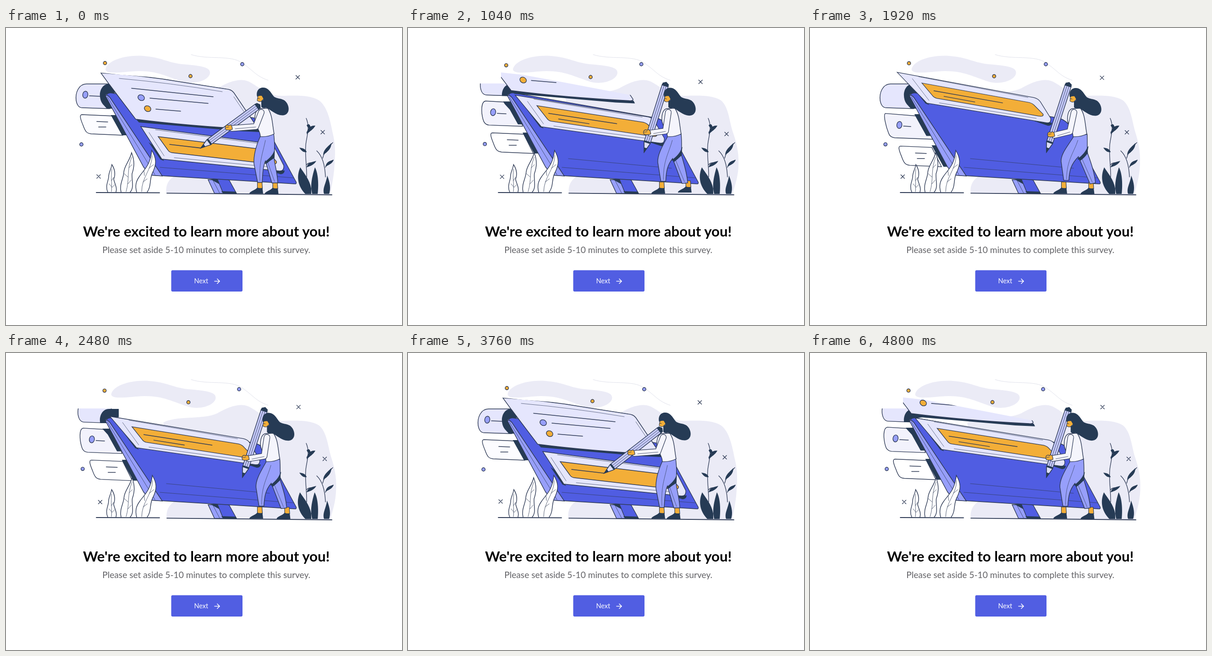
These frames come from a looping animation (864x648 px, 4.88 s). An HTML page with a canvas:

```html
<!DOCTYPE html>
<html lang="en">
<head>
<meta charset="utf-8">
<title>Survey welcome</title>
<style>
html, body { margin: 0; width: 864px; height: 648px; overflow: hidden; background: #fff; }
canvas, svg { position: absolute; left: 0; top: 0; display: block; }
text { font-family: Lato, sans-serif; text-anchor: middle; }
</style>
</head>
<body>
<canvas id="art" width="864" height="648"></canvas>
<svg width="864" height="648" viewBox="0 0 864 648">
  <text x="437.2" y="455.4" font-size="31.2" font-weight="700" fill="#050505">We're excited to learn more about you!</text>
  <text x="437.2" y="491.2" font-size="19.15" fill="#626266">Please set aside 5-10 minutes to complete this survey.</text>
  <rect x="360.5" y="528.5" width="155.5" height="46.5" rx="3" fill="#515ee2"/>
  <text x="425.8" y="557" font-size="14.4" fill="#fff">Next</text>
  <path d="M454.5 552.5H466M460.5 547L466 552.5L460.5 558" fill="none" stroke="#fff" stroke-width="1.6"/>
</svg>
<script>
const g = document.getElementById('art').getContext('2d');
const NAVY = '#263b55', INK = '#2e3a55', BLUE = '#505de2', PERI = '#979ffb',
      PALE = '#e5e6fd', GOLD = '#f3ae38', MIST = '#ebebf6', SHIRT = '#f5f5fc';
const LOOP = 4880, STEP = 80, HALF = 1840;

const lerp = (a, b, k) => a + (b - a) * k;
const clamp = k => Math.max(0, Math.min(1, k));
const smooth = k => (1 - Math.cos(Math.PI * clamp(k))) / 2;
const NUM = /-?\d+(\.\d+)?/g;

// value at s on eased keys
function track(s, times, vals) {
  let i = 0;
  while (i < times.length - 2 && s > times[i + 1]) i++;
  return lerp(vals[i], vals[i + 1], smooth((s - times[i]) / (times[i + 1] - times[i])));
}

// blend two paths of the same structure
function mix(a, b, k) {
  const to = b.match(NUM);
  let i = 0;
  return a.replace(NUM, v => lerp(+v, +to[i++], k).toFixed(2));
}

function shape(d, fill, stroke, width = 1.4) {
  const p = new Path2D(d);
  if (fill) { g.fillStyle = fill; g.fill(p); }
  if (stroke) { g.strokeStyle = stroke; g.lineWidth = width; g.stroke(p); }
}
const line = (d, width = 1.5, color = INK) => shape(d, null, color, width);

function oval(x, y, rx, ry, fill, turn = 0, width = 1.4) {
  g.beginPath();
  g.ellipse(x, y, rx, ry, turn, 0, 7);
  g.fillStyle = fill; g.fill();
  g.strokeStyle = INK; g.lineWidth = width; g.stroke();
}

function group(fn, x = 0, y = 0) {
  g.save(); g.translate(x, y); fn(); g.restore();
}

const DRIFT = [0, 640, 1160, 1360, HALF];
const drift = (s, ...vals) => track(s, DRIFT, vals);

function backdrop(s) {
  group(() => shape('M217 90C221 71 260 58 300 61C340 64 350 75 385 79C420 82 446 84 445 98C444 114 410 125 385 117C350 106 332 94 290 94C255 95 218 103 217 90Z', MIST),
    drift(s, 0, 8, 12.5, 12.5, 4));
  const calm = 'M343 152C370 136 430 146 460 132C485 118 510 108 530 117C555 130 570 149 605 148C640 147 665 147 683 158C702 172 708 205 713 230C718 250 719 270 717 292C716 325 710 345 708 363L350 361C348 345 352 328 378 318Z';
  const full = 'M343 152C370 136 430 146 460 132C485 118 510 108 530 117C555 130 570 149 605 148C640 147 665 147 683 158C697 172 694 198 704 222C713 242 725 268 725 300C725 330 714 345 708 363L352 361C350 345 356 330 378 318Z';
  shape(mix(calm, full, drift(s, 0, 1, .45, .05, .4)), MIST);
  line('M404 58C440 70 490 58 515 76C540 93 545 105 572 114', 1, '#dfe0ea');
}

function floaters(s) {
  const dot = (x, y, fill) => oval(x, y, 3.7, 3.7, fill, 0, 1.4);
  dot(drift(s, 216, 209, 215, 215, 216), drift(s, 76.5, 77, 82, 82.3, 76.5), GOLD);
  dot(drift(s, 402.5, 401, 398, 398, 402), drift(s, 105, 105, 107.3, 108.5, 105), GOLD);
  dot(drift(s, 515.5, 512.5, 508.6, 508.5, 515), 79, PERI);
  dot(drift(s, 164.5, 169.6, 167.4, 166, 164.5), drift(s, 254, 254, 253, 251.3, 254), PERI);
  const cross = (x, y) => line(`M${x - 4} ${y - 4}l8 8m0 -8l-8 8`, 1.3);
  cross(drift(s, 636.5, 638.5, 638.2, 638.2, 637), drift(s, 107.5, 114, 118, 117, 108));
  cross(drift(s, 691, 693, 695.3, 696.5, 691), drift(s, 227.3, 232.5, 231, 231.5, 227.3));
  cross(drift(s, 202, 203.5, 205.5, 205, 202), drift(s, 324, 322, 325, 326.8, 324));
}

// skew about the ground so only the tip travels
function sway(dx, tall, fn) {
  g.save();
  g.transform(1, 0, -dx / tall, 1, dx / tall * 360, 0);
  fn();
  g.restore();
}

function rightPlants(s) {
  const w = drift(s, 0, 1, .4, .2, 0);
  const leaf = d => shape(d, NAVY);
  line('M655 197C664 218 656 235 654 255C652 280 656 292 656 325M656 228Q661 220 668 217M654 270L645 264M656 298Q662 292 671 295', 1.3);
  leaf('M656 232C657 218 664 212 675 213C670 222 664 224 656 232Z');
  leaf('M656 212C662 207 664 212 665 220Q658 219 656 212Z');
  leaf('M656 271C648 272 643 266 640 261C648 262 654 264 656 271Z');
  leaf('M656 304C658 294 666 293 677 290C672 299 664 301 656 304Z');
  line('M678 268C691 280 696 300 697 325M691 284Q694 269 713 250M697 304Q700 293 714 288', 1.3);
  leaf('M692 277C693 265 700 261 710 251C710 263 702 270 692 277Z');
  leaf('M697 303C699 292 705 290 715 288C711 297 704 298 697 303Z');
  sway(-2 * w, 60, () => {
    leaf('M653 362C637 345 633 325 642 304C651 318 662 330 666 350L666 362Z');
    leaf('M668 362C664 345 666 330 674 304C682 318 682 345 680 362Z');
    leaf('M694 362C690 350 698 340 701 322C707 338 709 350 705 362Z');
  });
}

function leftPlants(s) {
  const w = drift(s, 0, 1, .25, .15, 0);
  sway(-2 * w, 60, () => {
    shape('M222 358C216 345 223 335 224 325C224 314 229 310 231 298C238 309 239 320 235 330C237 340 243 348 240 358', '#fff', INK);
    line('M231 308C228 325 232 340 230 357M230 333L235 326M230 346L225 340M231 348L237 342', .8);
  });
  sway(4 * w, 87, () => {
    shape('M251 358C247 340 256 330 257 315C258 300 270 290 274 272C281 290 280 303 275 318C274 333 280 348 271 358', '#fff', INK);
    line('M274 282C263 310 270 330 262 357M268 305L275 298M266 325L258 318M266 340L273 332', .8);
  });
  sway(5 * w, 91, () => {
    shape('M285 358C281 343 284 334 291 324C301 309 315 300 318 267C329 285 328 297 321 313C312 327 318 345 308 358', '#fff', INK);
    line('M319 278C318 310 296 325 296 357M312 306L322 298M302 322L301 312M299 336L308 329', .8);
  });
}

// sheets already rolled over the back edge
function roll(p) {
  const dx = 22 * p, dy = 66 * p;
  const edge = 'M226 122C205 121 199 150 211 166L222 178L292 304L315 304L218 145L246 140L246 122Z';
  const band = (top, bottom) => {
    const y = Math.max(121, top);
    g.save();
    g.beginPath(); g.rect(140, y, 200, bottom - y); g.clip();
    shape(edge, NAVY);
    g.restore();
  };
  const round = 'M225 122L176 122C158 122 151 142 153 158C155 169 159 174 167 174L226 176Z';
  const slant = 'M246 184L166 178C159 180 164 206 169 220C171 227 175 230 182 231L262 234Z';
  if (p > 0) {
    g.save();
    g.beginPath(); g.rect(140, 121, 200, 200); g.clip();
    group(() => shape(round, PALE, INK), 12 * (1 - p), -66 * (1 - p));
    g.restore();
    band(56 + dy, 110 + dy);
  }
  shape(mix(round, slant, p / .87), p < .3 ? PALE : '#f2f2fc', INK);
  band(122 + dy, 176 + dy * .9);
  group(() => {
    oval(173, 145.5, 5.6, 7.6, PERI, .15);
    line(`M182 148L${206 - 8 * p} 149`);
  }, dx, dy);
  group(() => {
    shape('M234 192L166 189C159 189 163 200 168 212C173 226 176 230 186 231L255 234Z', p ? '#fff' : '#fcfcff', INK);
    line('M198 204L222 205M202 216L218 216');
  }, dx * 1.45, dy * 1.04);
  band(190 + dy, 234 + dy * 1.04);
}

function board() {
  shape('M441 331L465 331L480 361L455 361Z', PERI, INK);
  line('M452 333L466 360', .8);
  shape('M446 330L466 330L468 342Z', NAVY);
  shape('M458 322L487 332L503 361L474 361Z', BLUE, INK);
  shape('M470 356L501 357L504 362L474 362Z', NAVY);
  shape('M218 149Q220 140 232 142L545 197Q560 203 567 214L633 336Q635 341 629 340L318 321Z', BLUE, INK);
  line('M350 285L575 306M336 304L627 327', .7);
  shape('M217 148Q220 144 227 152L341 323L314 321L300 303Z', PERI, INK);
  line('M221 150L325 320', .8);
}

function questionSheet(p) {
  g.save();
  const far = 132 + 23 * p;
  g.clip(new Path2D(`M203 97L250 102L330 ${108 + 15 * p}L480 ${far}L600 ${far + 18}L600 400L203 400Z`));
  g.translate(-100 * p, -108 * p);
  shape('M283 198L550 221L553 227L510 225L290 206Z', NAVY);
  shape('M207 98Q300 103 390 119L480 133Q492 134 497 141L549 218Q548 222 540 221Q400 214 283 199L226 124Z', PALE, INK);
  line('M247 110Q360 120 472 139M226 123L269 181M497 150L520 184', .7);
  line('M274 131.5L452 150M314 153L441 164.5M327 177L381 181.5', 1.6);
  oval(295, 152, 7.4, 6, PERI, .5);
  oval(309, 176, 7.4, 6, GOLD, .5);
  g.restore();
}

function answerSheet(p, tip) {
  g.save();
  g.translate(332 - 88 * p, 237 - 117 * p);
  g.transform(1 + .012 * p, .077 * p, .06 * p, 1 - .115 * p, 0, 0);
  g.translate(-332, -237);
  shape('M311 249L322 257L345 290L337 287Z', NAVY);
  shape('M560 307L608 311Q607 319 599 319Z', NAVY);
  shape(`M${294 - 14 * p} 215L573 252Q582 254 586 261L606 300Q607 313 596 312L340 286Z`, PALE, INK);
  line('M326 222L560 253M312 228L345 279M367 283L575 303', .7);
  shape('M332 237L562 265Q570 267 574 273L590 291Q592 298 580 297L362 272Q356 271 353 266Z', GOLD, INK);
  const k = (tip - 357) / 147;
  line(`M357 254L${tip} ${254 + 17 * k}`, 1.6);
  if (p > 0) line(`M378 266L${378 + 66 * clamp(p * 2)} ${266 + 8 * clamp(p * 2)}`, 1.5);
  g.restore();
}

function pencil(x, y, angle) {
  g.save();
  g.translate(x, y);
  g.rotate(angle);
  shape('M0 0L22 -7L153 -7L153 7L22 7Z', '#c6cafb', INK);
  line('M24 -2.3L152 -2.3M24 2.3L152 2.3', .8);
  shape('M0 0L22 -7Q26 0 22 7Z', '#dcdef6', INK);
  shape('M0 0L10 -3.4L10 3.4Z', NAVY);
  shape('M21 -7L25 -7L25 7L21 7Z', NAVY);
  shape('M151 -7.5L157 -7L161 0L157 7L151 7.5Z', NAVY);
  g.restore();
}

function foot(x, y) {
  shape(`M${x} ${y - 13}h10l1 14h-11Z`, GOLD, INK, 1.2);
  shape(`M${x} ${y - 1}q5 3 11 1l1.5 12.5h-30c0 -5 12 -7 17.5 -13.5Z`, NAVY);
}

function person(s, p, write, tip, angle) {
  const k = p / .87, c = clamp(k), shift = 19 * p;
  const hop = clamp((s - 1200) / 160) * clamp((1520 - s) / 160);
  const step = Math.sin(Math.PI * clamp((s - 640) / 480));
  const feet = clamp(p / .62);
  foot(548.5 + 5 * hop, 349 - 5 * hop);
  foot(582 + 26 * feet, 349.5 - 6 * step);
  shape(mix('M563 293L587 262L584 272L568 292Z', 'M581 287L605 258L602 274L584 288Z', k), NAVY);
  shape(mix(
    'M555 236C545 258 540 278 541 296L549 337L559 337C560 315 561 302 566 290L580 338L593 338C592 315 587 302 585 285C586 268 587 250 584 231Z',
    'M573 236C560 258 546 275 547 292L553 333L564 333C565 312 568 298 583 282L607 340L619 338C617 315 610 295 603 275C602 260 603 245 602 232Z', k), PERI, INK);
  shape(mix('M565 292C575 284 585 275 586 263L585 284Q575 290 567 297Z', 'M583 285C590 280 600 270 603 259L603 275Q595 285 586 291Z', k), NAVY);
  line(mix('M566 245C560 275 552 290 554 333M570 290L586 335', 'M582 245C574 272 559 288 559 330M590 285L612 336', k), .7);
  group(() => shape('M553 176C545 178 542 190 543 203C546 218 555 224 555 237Q572 238 585 231C581 212 582 190 571 175Z', SHIRT, INK), shift);
  pencil(tip.x, tip.y, angle);

  const hx = lerp(lerp(486, 513, write), 526, c), hy = lerp(lerp(217, 218, write), 232, c);
  const ex = lerp(lerp(545, 552, write), 567, c), ey = lerp(lerp(215, 222, write), 226, c);
  const arm = `M${557 + shift} 184L${ex} ${ey}L${hx + 7} ${hy + 2}`;
  g.lineJoin = 'round';
  line(arm, 14);
  line(arm, 11.6, SHIRT);
  g.lineJoin = 'miter';
  line(`M${ex} ${ey + 1}L${hx + 14} ${hy + 3}`, .8);
  group(() => {
    shape('M-7 -3Q-4 -7 0 -4Q4 -8 7 -2L8 4Q2 7 -6 5Q-9 2 -7 -3Z', GOLD, INK, 1.2);
    line('M-6 0L0 -1', .9);
  }, hx, hy);

  group(() => {
    shape('M557 158L567 157L569 173Q561 177 557 172Z', NAVY);
    shape('M550 146L548 158Q551 162 557 160L562 155L562 145Z', GOLD, INK, 1.1);
    shape('M548 150C545 139 551 129 562 130C574 131 578 142 585 150C594 156 606 152 613 164C620 176 617 189 605 190.5C590 192 578 178 566 173C557 172 559 162 562 155L558 148Q553 147 548 150Z', NAVY);
    line('M549 153L553 154', 1);
  }, shift, p);
}

function frame(now) {
  const t = Math.floor(now % LOOP / STEP) * STEP;
  // the scene plays forward, then back
  const u = t % (2 * HALF), s = u < HALF ? u : 2 * HALF - u;
  const write = smooth(s / 640);
  const p = track(s, [0, 640, 1120, 1200, 1360, 1500, HALF], [0, 0, .62, .65, .87, 1, 1]);
  const lean = clamp(p / .62);
  const tip = { x: lerp(lerp(425, 504, write), 516, lean), y: lerp(262, 271, write) };
  const angle = lerp(lerp(-36.3, -78.9, write), -72, lean) * Math.PI / 180;

  g.clearRect(0, 0, 864, 648);
  g.lineCap = 'round';
  backdrop(s);
  rightPlants(s);
  roll(p);
  board();
  if (s < 1160) questionSheet(p);
  answerSheet(p, lerp(425, 504, write));
  line('M197 359L335 359.5M351 360.3L711 364', 1.8);
  leftPlants(s);
  person(s, p, write, tip, angle);
  floaters(s);
  requestAnimationFrame(() => frame(performance.now() - start));
}
const start = performance.now();
frame(0);
</script>
</body>
</html>
```
